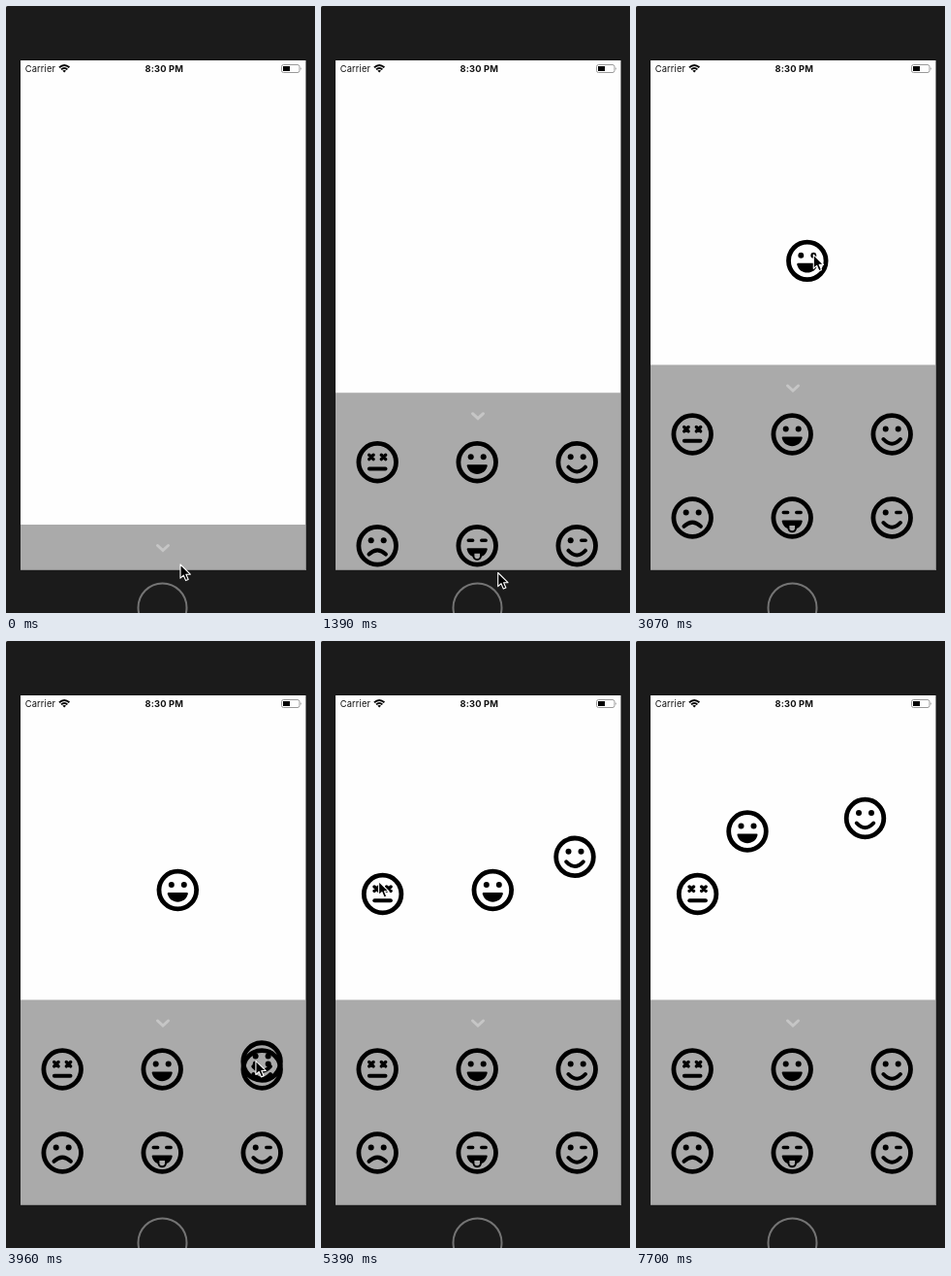
Write an HTML page that moves like this. It is 319 by 625 pixels and loops after 8.84 s.

```html
<!DOCTYPE html>
<html lang="en">
<head>
<meta charset="utf-8">
<title>Emoji tray</title>
<style>
  html, body { margin: 0; height: 100%; overflow: hidden; background: #1b1b1b; }
  svg { display: block; }
  text { font-family: Inter, Roboto, sans-serif; font-size: 9.3px; letter-spacing: .15px; fill: #111; }
  .line { fill: none; stroke: #000; stroke-width: 4; stroke-linecap: round; stroke-linejoin: round; }
  .thin { stroke-width: 3.4; }
</style>
</head>
<body>
<svg width="319" height="625" viewBox="0 0 319 625">
  <defs>
    <clipPath id="screen"><rect x="15" y="56" width="294" height="524"/></clipPath>
    <circle id="ring" r="19.3" class="line" style="stroke-width:4.8"/>
    <g id="eyes"><circle cx="-6.5" cy="-5.5" r="3"/><circle cx="6.5" cy="-5.5" r="3"/></g>
    <path id="curve" class="line" d="M-8.7 5Q0 14.5 8.7 5"/>
    <path id="mouth" d="M-9.5 2.5H9.5Q10.7 2.5 10.5 3.8C9.5 9 5 12.2 0 12.2S-9.5 9 -10.5 3.8Q-10.7 2.5 -9.5 2.5Z"/>
    <g id="dead">
      <use href="#ring"/>
      <path class="line thin" d="M-8.5 -7.5l4.4 4.4m0 -4.4l-4.4 4.4M4.1 -7.5l4.4 4.4m0 -4.4l-4.4 4.4"/>
      <path class="line" d="M-8.3 6.7H8.3"/>
    </g>
    <g id="laugh"><use href="#ring"/><use href="#eyes"/><use href="#mouth"/></g>
    <g id="smile"><use href="#ring"/><use href="#eyes"/><use href="#curve"/></g>
    <g id="sad">
      <use href="#ring"/><use href="#eyes"/>
      <path class="line" d="M-8.7 8.8Q0 .4 8.7 8.8"/>
    </g>
    <g id="tongue">
      <use href="#ring"/><use href="#mouth"/>
      <path class="line thin" d="M-9 -5.5h4.5M4.5 -5.5h4.5"/>
      <path d="M-3.8 7H3.8V10.5A3.8 3.8 0 0 1 -3.8 10.5Z" fill="#aaa" stroke="#000" stroke-width="2"/>
    </g>
    <g id="wink">
      <use href="#ring"/><use href="#curve"/>
      <circle cx="-6.5" cy="-5.5" r="3"/>
      <path class="line thin" d="M4.5 -5.5h4.5"/>
    </g>
  </defs>

  <rect width="319" height="625" fill="#1b1b1b"/>
  <path d="M0 0H1.5L0 1.5Z" fill="#999"/>
  <circle cx="161.5" cy="619.5" r="25" fill="none" stroke="#747474" stroke-width="2"/>
  <rect x="15" y="56" width="295" height="525" fill="#8c8c8c"/>

  <g clip-path="url(#screen)">
    <rect x="15" y="56" width="295" height="525" fill="#fefefe"/>
    <text x="19.7" y="68">Carrier</text>
    <text x="163.3" y="68" font-weight="700" text-anchor="middle">8:30 PM</text>
    <g fill="none" stroke="#000" stroke-width="1.9">
      <path d="M55 63.2Q60.2 58.6 65.4 63.2M57 65.4Q60.2 62.6 63.4 65.4"/>
      <path d="M58.3 66.6Q60.2 65.2 62.1 66.6L60.2 68.6Z" fill="#000" stroke="none"/>
    </g>
    <rect x="284.5" y="60.5" width="18.5" height="8" rx="2" fill="none" stroke="#999"/>
    <rect x="286" y="62" width="7" height="5" fill="#000"/>
    <path d="M304 63q1.6 1.5 0 3Z" fill="#888"/>
    <g id="tray">
      <rect x="15" width="295" height="220" fill="#aaa"/>
      <path d="M156.5 21.5L162 26.5L167.5 21.5" fill="none" stroke="#c6c6c6" stroke-width="3" stroke-linecap="round"/>
    </g>
    <g id="dropped"></g>
  </g>

  <path id="cursor" d="M0 0V14.2L3.3 11.2L5.6 16.6L8.2 15.5L5.9 10.2H10.3Z"
        fill="#000" stroke="#fff" stroke-width="1.1" stroke-linejoin="round"/>
</svg>

<script>
const LOOP = 8840, CURSOR_GONE = 7690;
const TRAY_CLOSED = 534, TRAY_OPEN = 369.5;
const DRAG_SLOP = 8; // distance the cursor gains before a face starts to follow

const byId = id => document.getElementById(id);
const tray = byId("tray"), cursor = byId("cursor");
const parts = [];

function addPart(node, x, y, isVisible) {
  const part = { node, home: [x, y], moves: [], isVisible };
  parts.push(part);
  return part;
}

const faces = {};
["dead", "laugh", "smile", "sad", "tongue", "wink"].forEach((name, i) => {
  const x = 58.2 + 103 * (i % 3), y = 71.5 + 86 * Math.floor(i / 3);
  tray.innerHTML += `<use href="#${name}" x="${x}" y="${y}"/>`;
  const copy = byId("dropped").appendChild(byId(name).cloneNode(true));
  copy.removeAttribute("id");
  faces[name] = addPart(copy, x, TRAY_OPEN + y,
    (t, moves) => moves.length > 0 && t >= moves[0].start);
});
const panel = addPart(tray, 0, TRAY_CLOSED, () => true);
const pointer = addPart(cursor, 180, 575, t => t < CURSOR_GONE);

const ease = p => (1 - Math.cos(Math.PI * Math.min(1, Math.max(0, p)))) / 2;

function positionAt({ home, moves }, t) {
  return moves.reduce(([x, y], m) => {
    const k = ease((t - m.start) / (m.end - m.start));
    return [x + (m.x - x) * k, y + (m.y - y) * k];
  }, home);
}

const move = (part, start, end, x, y) => part.moves.push({ start, end, x, y });

function drag(face, start, end, x, y) {
  const [fx, fy] = positionAt(face, start), [px, py] = positionAt(pointer, start);
  const dx = x - fx, dy = y - fy, reach = 1 + DRAG_SLOP / Math.hypot(dx, dy);
  move(face, start, end, x, y);
  move(pointer, start, end, px + dx * reach, py + dy * reach);
}

move(pointer, 40, 340, 185, 496);
move(pointer, 340, 630, 180, 560);
move(panel, 1050, 1520, 0, TRAY_OPEN);
move(pointer, 1050, 1390, 182.7, 583.5);
move(pointer, 1780, 2210, 170, 431);
move(pointer, 2370, 2490, 167, 442.5);
drag(faces.laugh, 2690, 3120, 177.3, 256.5);
move(pointer, 3470, 3880, 258, 440.5);
drag(faces.smile, 3900, 4400, 262, 222.3);
move(pointer, 4530, 4880, 54, 436);
drag(faces.dead, 4900, 5390, 63.6, 260.5);
move(pointer, 5550, 5860, 173, 251);
drag(faces.laugh, 5880, 6310, 115, 196);
move(pointer, 6470, 6750, 319, 215);
move(pointer, 6750, 6990, 271, 225);
drag(faces.smile, 7150, 7400, 236.5, 182.5);
move(pointer, 7560, 7660, 286, 444);

function draw(t) {
  for (const part of parts) {
    const visible = part.isVisible(t, part.moves);
    part.node.setAttribute("visibility", visible ? "visible" : "hidden");
    part.node.setAttribute("transform", `translate(${positionAt(part, t)})`);
  }
}

const began = performance.now();
function tick() {
  draw((performance.now() - began) % LOOP);
  requestAnimationFrame(tick);
}
tick();
</script>
</body>
</html>
```
